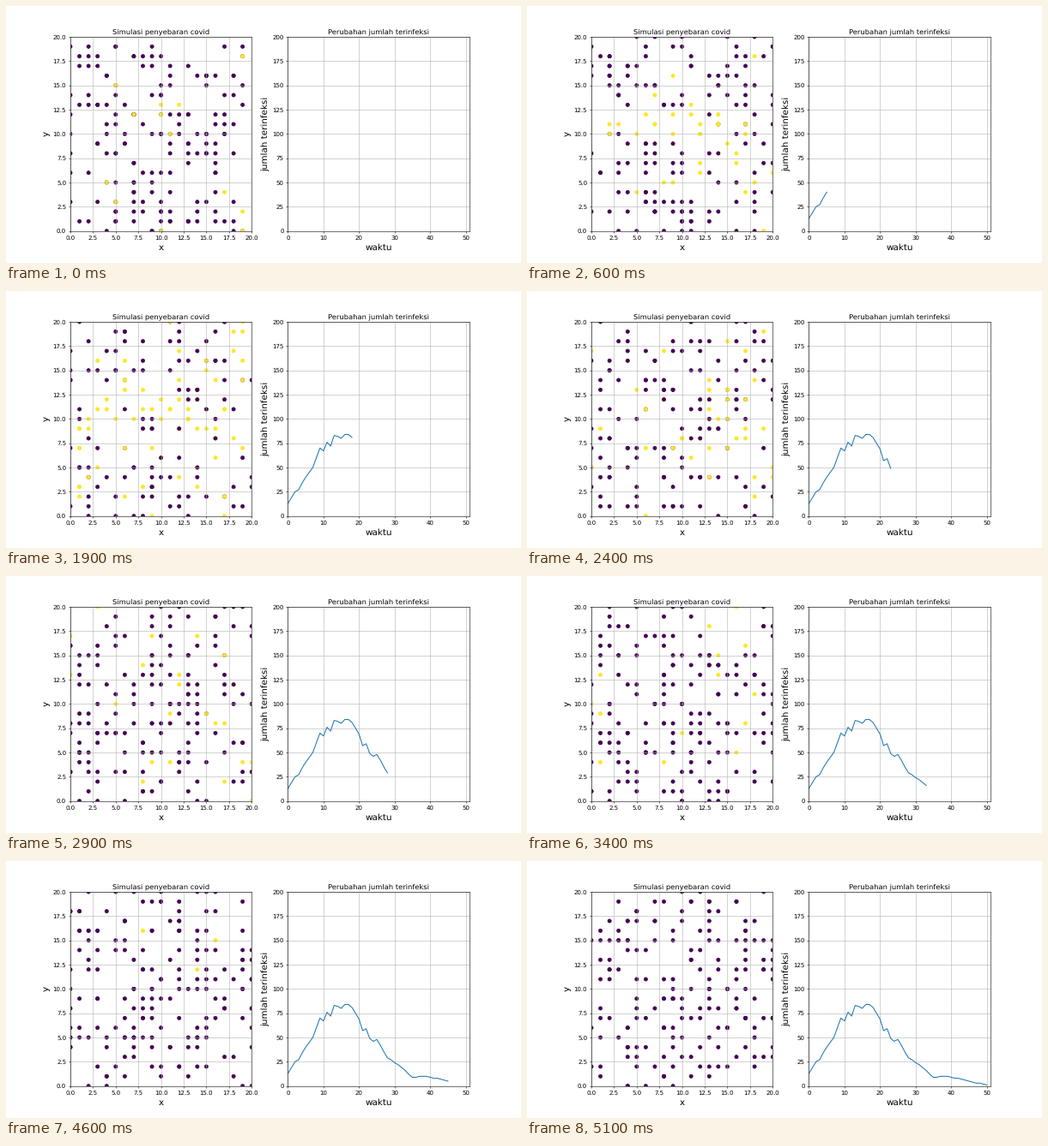
A matplotlib script that plays this animation: 600x300 px, repeating every 5200 ms.

```python
import numpy as np
import matplotlib.pyplot as plt
from matplotlib.animation import FuncAnimation

SIZE = 20
PEOPLE = 180
STEPS = 52
VISIBLE = 0.9  # share of the plotted count that shows as yellow dots

# Turning points of the epidemic curve: (time, infected)
TURNS = [(0, 13), (2, 25), (3, 27), (5, 40), (7, 50), (9, 70), (10, 67),
         (11, 76), (12, 72), (13, 83), (15, 80), (16, 84), (17, 84), (18, 81),
         (20, 69), (21, 57), (22, 59), (23, 49), (24, 46), (25, 48), (28, 29),
         (31, 22), (35, 9), (39, 10), (50, 1)]


def spread(pos, sick, target, rng):
    """Infect mostly nearby healthy people or heal random ones."""
    change = target - sick.sum()
    if change > 0:
        healthy = np.flatnonzero(~sick)
        gap = np.abs(pos[healthy, None] - pos[sick]).sum(axis=2).min(axis=1)
        order = np.argsort(gap + 8 * rng.random(len(healthy)))
        sick[healthy[order[:change]]] = True
    elif change < 0:
        sick[rng.choice(np.flatnonzero(sick), -change, replace=False)] = False


def simulate(counts):
    rng = np.random.default_rng(19)
    pos = rng.integers(0, SIZE, (PEOPLE, 2))
    sick = np.arange(PEOPLE) >= PEOPLE - int(counts[0])
    states = [(pos, sick.copy())]
    for count in counts:
        pos = (pos + rng.integers(-1, 2, pos.shape)) % (SIZE + 1)
        spread(pos, sick, int(count * VISIBLE), rng)
        states.append((pos, sick.copy()))
    return states


def style(ax, title, xlabel, ylabel, xmax, ymax):
    ax.set_title(title, fontsize=12)
    ax.set_xlabel(xlabel, fontsize=15)
    ax.set_ylabel(ylabel, fontsize=15)
    ax.set_xlim(0, xmax)
    ax.set_ylim(0, ymax)
    ax.grid(True)


counts = np.round(np.interp(np.arange(STEPS - 1), *zip(*TURNS)))
states = simulate(counts)

plt.rcParams["text.hinting"] = "none"
fig, (field, chart) = plt.subplots(1, 2, figsize=(12, 6), dpi=50)
fig.subplots_adjust(left=0.125, right=0.8995, bottom=0.1245, top=0.88, wspace=0.2)
style(field, "Simulasi penyebaran covid", "x", "y", SIZE, SIZE)
style(chart, "Perubahan jumlah terinfeksi", "waktu", "jumlah terinfeksi", 51, 200)

start, ill = states[0]
dots = field.scatter(start[:, 0], start[:, 1], c=ill.astype(float),
                     cmap="viridis", vmin=0, vmax=1)
curve, = chart.plot([], [])


def draw(step):
    pos, sick = states[step]
    dots.set_offsets(pos)
    dots.set_array(sick.astype(float))
    curve.set_data(range(step), counts[:step])
    return dots, curve


anim = FuncAnimation(fig, draw, frames=STEPS, interval=100,
                     init_func=lambda: draw(0), repeat=True, repeat_delay=0)
plt.show()
```
